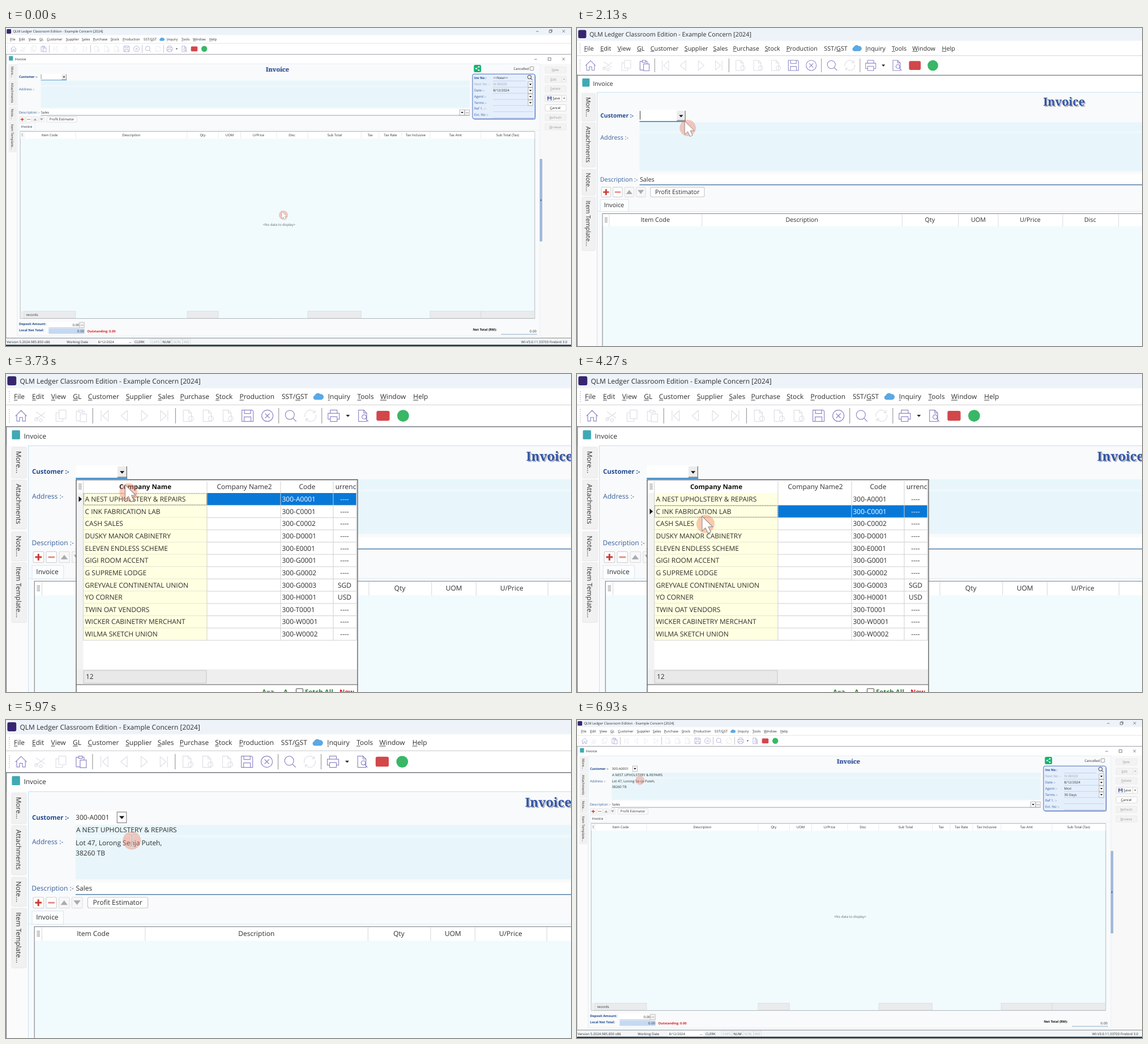
These frames come from a looping animation (998x561 px, 7.2 s). An HTML page with a canvas:

```html
<!DOCTYPE html>
<html lang="en">
<head>
<meta charset="utf-8">
<title>Invoice entry</title>
<style>
html, body { margin: 0; width: 100%; height: 100%; overflow: hidden; background: #fff; }
canvas { display: block; }
</style>
</head>
<body>
<canvas id="stage" width="998" height="561"></canvas>
<script>
const c = document.getElementById('stage').getContext('2d');
const LOOP = 7200, ZOOM = 2.003;
const INK = '#2e2e2e', NAVY = '#1f4a91', LABEL = '#375f9e', PURPLE = '#8d89c8', OFF = '#dedfe6';

// ---------- helpers ----------
function rect(x, y, w, h, fill, stroke, r = 0, lw = .6) {
  c.beginPath();
  c.roundRect(x, y, w, h, r);
  if (fill) { c.fillStyle = fill; c.fill(); }
  if (stroke) { c.strokeStyle = stroke; c.lineWidth = lw; c.stroke(); }
}
function line(x1, y1, x2, y2, color, lw = .6) {
  c.beginPath(); c.moveTo(x1, y1); c.lineTo(x2, y2);
  c.strokeStyle = color; c.lineWidth = lw; c.stroke();
}
function disc(x, y, r, color) {
  c.beginPath(); c.arc(x, y, r, 0, 7); c.fillStyle = color; c.fill();
}
// y is the middle of the capitals; key is the index of an underlined letter
function text(s, x, y, { color = INK, bold = false, align = 'left', size = bold ? 5.7 : 6, key = -1 } = {}) {
  c.font = `${bold ? 'bold ' : ''}${size}px "Open Sans", "Noto Sans", sans-serif`;
  c.textAlign = 'left';
  c.fillStyle = color;
  const w = c.measureText(s).width, base = y + size * .355;
  x -= align === 'center' ? w / 2 : align === 'right' ? w : 0;
  c.fillText(s, x, base);
  if (key >= 0) {
    const a = x + c.measureText(s.slice(0, key)).width;
    line(a, base + .9, a + c.measureText(s[key]).width, base + .9, color, .45);
  }
}
function path(d, x, y, stroke, fill, lw = .6) {
  c.save();
  c.translate(x, y);
  const p = new Path2D(d);
  if (fill) { c.fillStyle = fill; c.fill(p); }
  if (stroke) { c.strokeStyle = stroke; c.lineWidth = lw; c.lineJoin = 'round'; c.stroke(p); }
  c.restore();
}
const down = (x, y, color = '#111', k = 1) => path(`M${-2 * k} ${-k}H${2 * k}L0 ${1.2 * k}Z`, x, y, null, color);
function combo(x, y) { rect(x, y, 8.3, 9.6, '#fdfdfd', '#8a8a8a'); down(x + 4.15, y + 4.8, '#111', 1.15); }
function dots(x, y) {
  rect(x, y, 8.5, 9.4, '#f4f4f4', '#9a9a9a');
  for (let i = 0; i < 3; i++) rect(x + 2 + i * 1.9, y + 4.5, .9, .9, '#222');
}
function gridMark(x, y, k = 1) {
  for (let i = -2; i < 3; i++) line(x - 1.4 * k, y + i * 1.15 * k, x + 1.4 * k, y + i * 1.15 * k, '#888', .45 * k);
}

// ---------- window frame ----------
const MENU = [['File', 7], ['Edit', 23], ['View', 39.8], ['GL', 59], ['Customer', 72.3], ['Supplier', 105.7],
  ['Sales', 134], ['Purchase', 153.5], ['Stock', 184.8], ['Production', 206], ['SST/GST', 243.1, 4],
  ['Inquiry', 283.9], ['Tools', 309.8], ['Window', 330], ['Help', 359.1]];
const RING = 'M-5 0a5 5 0 1 0 10 0a5 5 0 1 0-10 0';
const PAGE = 'M-3.6-5H1L3.6-2.4V5H-3.6ZM1-5V-2.4H3.6';
const BADGE = PAGE + 'M1 2.5a2.2 2.2 0 1 0 4.4 0a2.2 2.2 0 1 0-4.4 0';
const CLIP = 'M-2-4H-4.5V4.5H-1M2.5-1.5V-4H1M-2.2-5H1V-3H-2.2ZM-1-1.5H4.5V5.3H-1Z';
const TOOLS = [
  [13.3, 'M-5 .3 0-4.7 5 .3M-3.8-.8V4.7H-1.3V1.4H1.3V4.7H3.8V-.8', 1],
  [30.5, 'M-4-3.5 4 2M-4 3 4-3M-5 3a1.3 1.3 0 1 0 2.6 0a1.3 1.3 0 1 0-2.6 0M-1 4a1.3 1.3 0 1 0 2.6 0a1.3 1.3 0 1 0-2.6 0'],
  [48.5, 'M-1.8-5H4.4V2.6H-1.8ZM-1.8-2.6H-4.4V5H1.6V2.6'],
  [87, 'M-3.2-4.8V4.8M3.2-4.6V4.6L-1.8 0Z'], [104.5, 'M2.6-4.7V4.7L-3 0Z'],
  [122, 'M-2.6-4.7V4.7L3 0Z'], [139.5, 'M3.2-4.8V4.8M-3.2-4.6V4.6L1.8 0Z'],
  [160, BADGE], [177.5, BADGE], [195, BADGE],
  [213, 'M-5-5H4L5-4V5H-5ZM-2.8-5V-2H2.8V-5M-3 5V1H3V5', 1],
  [230.5, RING + 'M-2-2 2 2M-2 2 2-2', 1],
  [251, 'M-4.7-.8a4 4 0 1 0 8 0a4 4 0 1 0-8 0M2.2 2.2 5 5', 1],
  [268.5, 'M-4.8 1A4.8 4.8 0 0 1 4-2.6V-5M4-2.6H1.6M4.8-1A4.8 4.8 0 0 1-4 2.6V5M-4 2.6H-1.6'],
  [289, 'M-3-2.2V-5H3V-2.2M-3 3H-5V-2.2H5V3H3M-3 .8H3V5H-3Z', 1],
  [314.5, PAGE + 'M-.6 1a1.9 1.9 0 1 0 3.8 0a1.9 1.9 0 1 0-3.8 0M2.7 2.6 5 5', 1]];

function drawFrame(popup) {
  rect(0, 0, 998, 561, '#fff');
  rect(0, 0, 998, 12.6, '#edf3f9');
  rect(1.2, 2, 7.9, 8, '#37266f', null, 1.5);
  text('QLM Ledger Classroom Edition - Example Concern [2024]', 12.2, 6.3);
  controls(938.5, 962, 985, 5.6, true);
  for (let y = 15; y < 25; y += 1.8) rect(2.6, y, .7, .7, '#b5b5b5');
  for (const [s, x, key = 0] of MENU) text(s, x, 20, { key });
  path('M-2.6 2.5a1.8 1.8 0 0 1-.2-3.5a2.7 2.7 0 0 1 4.6-1.1a2.3 2.3 0 0 1 1 4.6Z', 275.3, 20, '#3f8fd6', '#5aa9e6', .3);
  line(0, 27.2, 998, 27.2, '#d3d3d3');
  for (let y = 31; y < 43; y += 1.8) rect(2.6, y, .7, .7, '#b5b5b5');
  for (const x of [76.5, 149.5, 240.5, 278.5]) line(x, 30, x, 43.5, '#9c9c9c');
  for (const [x, d, on] of TOOLS) path(d, x, 36.8, on ? PURPLE : OFF);
  path(CLIP, 66.5, 36.8, popup ? OFF : PURPLE);
  down(301.5, 36.8, '#222', .85);
  rect(326.7, 32.4, 11.6, 8.8, '#d2474a', null, 1.6);
  disc(350.2, 36.8, 5.2, '#38b766');

  line(0, 46.4, 998, 46.4, '#737982', .7);
  line(.3, 46, .3, 547, '#737982', .7);
  rect(5.2, 49.6, 7.2, 8, '#3fa9b5', null, .8);
  text('Invoice', 15.7, 54.6);
  controls(935.6, 960, 984.8, 54.8);
}
function controls(a, b, d, y, restore) {
  line(a - 2.3, y + .4, a + 2.3, y + .4, '#333');
  if (restore) { path('M-1.3-1.5V-2.6H2.6V1.3H1.5', b, y, '#333'); rect(b - 2.6, y - 1.4, 4, 4, null, '#333'); }
  else rect(b - 2.5, y - 2.5, 5, 5, null, '#333');
  path('M-2.4-2.4 2.4 2.4M-2.4 2.4 2.4-2.4', d, y, '#333');
}

// ---------- invoice form ----------
const SIDE = [['More...', 64.5, 27], ['Attachments', 93.3, 43.3], ['Note...', 139, 25.5], ['Item Template...', 166.3, 52.5]];
const COLS = [['Item Code', 31.7, 77], ['Description', 123, 221.3], ['Qty', 320, 347.3], ['UOM', 375.3, 395],
  ['U/Price', 414.6, 446], ['Disc', 478, 505], ['Sub Total', 533, 580.5], ['Tax', 627.5, 643.3], ['Tax Rate', 659, 679],
  ['Tax Inclusive', 699, 723.5], ['Tax Amt', 749, 794], ['Sub Total (Tax)', 839, 886]];
const BUTTONS = ['New', 'Edit', 'Delete', 'Save', 'Cancel', 'Refresh', 'Browse'];

function drawForm(s) {
  rect(.7, 63, 19, 483.5, '#fbfbfb');
  for (const [label, y, h] of SIDE) {
    rect(5, y, 13, h, '#f1f1f1', '#e8e8e8', 1, .5);
    c.save();
    c.translate(11, y + 3.4);
    c.rotate(Math.PI / 2);
    text(label, 0, 0);
    c.restore();
  }
  rect(19.8, 63.2, 923.5, 480.5, '#f9fafb', '#c2dff5', 0, .5);

  c.font = 'bold 11px "Noto Serif", "DejaVu Serif", serif';
  c.textAlign = 'center';
  c.fillStyle = '#aeb0b8'; c.fillText('Invoice', 480.3, 77.4);
  c.fillStyle = '#3154a6'; c.fillText('Invoice', 479.3, 76.5);

  text('Customer :-', 23, 86, { color: NAVY, bold: true });
  text('Address :-', 23, 107.5, { color: LABEL });
  text('Description :-', 22.7, 148.7, { color: LABEL });
  rect(61.5, 92.7, 757.5, 9, '#e8f6fb');
  rect(61.5, 103.4, 757.5, 37.3, '#e8f6fb');
  rect(61.5, 101.7, 757.5, 1.7, '#f0f8fc');
  rect(61.5, 80.5, 46, 11.5, '#fff');
  if (s.filled) {
    combo(98.2, 81.2);
    text('300-A0001', 61.6, 85.8);
    text('A NEST UPHOLSTERY & REPAIRS', 62, 97);
    text('Lot 47, Lorong Senja Puteh,', 61.6, 108.3);
    text('38260 TB', 61.6, 117.5);
  } else {
    rect(98.3, 81.3, 8.3, 9.8, '#ececec');
    line(106.5, 81.3, 106.5, 91.2, '#666', .6);
    line(98.3, 90.9, 106.7, 90.9, '#666', .6);
    down(102.4, 86.5);
    line(61.5, 91.9, 107, 91.9, '#1f78bd', .8);
    if (!s.popup) line(62.1, 81.5, 62.1, 90, '#222', .5);
  }
  rect(61.5, 143.6, 757.5, 10.2, '#fff');
  text('Sales', 61.8, 148.6);
  line(61.5, 154.1, 819, 154.1, '#35699b', .6);
  combo(801.5, 144.3);
  dots(810.3, 144.4);

  for (const x of [24, 35.4]) rect(x, 156.5, 9.3, 9.6, '#fdfdfd', '#d2d2d2', 1);
  for (const x of [46.8, 58.2]) rect(x, 156.5, 9.3, 9.6, '#f7f7f7', '#e0e0e0', 1);
  path('M-2.9 0H2.9M0-2.9V2.9', 28.6, 161.3, '#cc3a33', null, 1.5);
  path('M-2.9 0H2.9', 40.1, 161.3, '#e38b85', null, 1.4);
  path('M-3.1 2H3.1L0-2ZM8.3-2H14.5L11.4 2Z', 51.4, 161.2, null, '#aaabb0');
  rect(72.2, 156.5, 53.2, 9.5, '#fefefe', '#c9c9c9', 1.5);
  text('Profit Estimator', 98.7, 161.1, { align: 'center' });
  line(20, 180.2, 943, 180.2, '#dce9f3', .5);
  rect(23, 168.6, 27.8, 11.8, '#fbfdfe', '#d9e5ef', 0, .5);
  text('Invoice', 26.6, 174);

  drawGrid(s.hover);
  drawTotals();
  drawNumbers(s.filled);
  drawSide();
  drawStatus();
}
function drawGrid(hover) {
  rect(25.1, 182.5, 908.8, 330, '#f1fbfd', '#858a8e', 0, .6);
  rect(25.5, 182.9, 908, 12, '#fff');
  gridMark(28.6, 188.7);
  if (hover) {
    rect(123, 183, 197, 12, '#d5e7f7');
    path('M-2-2H2L.6 0V2.2H-.6V0Z', 316.4, 187.9, '#7f93aa', null, .5);
  }
  rect(25.6, 499.3, 6, 12.9, '#eee');
  COLS.forEach(([label, x, mid], i) => {
    line(x, 183, x, 195, '#d3d7da', .5);
    text(label, hover && i === 1 ? 218.5 : mid, 188.6, { align: 'center' });
    const end = i < 11 ? COLS[i + 1][1] : 933.6;
    if ([0, 2, 6, 10, 11].includes(i)) rect(x, 499.5, end - x, 12.4, '#e9ebec', '#cdd1d3', 0, .5);
  });
  text('records', 35.5, 505.5);
  text('<No data to display>', 482.4, 346.5, { align: 'center', color: '#666' });
}
function drawTotals() {
  const bold = true, right = { align: 'right' };
  text('Deposit Amount:', 23, 521.6, { color: NAVY, bold });
  rect(75.5, 518.5, 54, 10.3, '#fff');
  line(75.5, 528.9, 129.5, 528.9, '#6d8fb8');
  text('0.00', 129.3, 523.7, right);
  dots(129.7, 519.2);
  text('Local Net Total:', 23, 533, { color: NAVY, bold });
  rect(75.3, 530.2, 63.4, 9.2, '#c4d9f2');
  text('0.00', 138, 535, right);
  text('Outstanding: 0.00', 143.5, 535, { color: '#d41f26', bold });
  text('Net Total (RM):', 824.7, 532.3, { bold, color: '#111' });
  text('0.00', 937, 534.6, right);
  line(874.5, 540.3, 938, 540.3, '#4b76ad');
}
function drawNumbers(filled) {
  rect(826.4, 65, 12.8, 13, '#14b371', null, 2.5);
  path('M2.3-3-2.6 0 2.3 3', 832.9, 71.5, '#fff');
  for (const [x, y] of [[835.2, 68.5], [830.3, 71.5], [835.2, 74.5]]) disc(x, y, 1.3, '#fff');
  text('Cancelled', 896.5, 71.5);
  rect(925.7, 68.2, 6.2, 6.4, '#fff', '#555', .6);

  rect(825.5, 82.5, 110.3, 79.4, '#bcc6da', null, 3);
  rect(824, 81.2, 110.4, 79, '#e5effc', '#4a6cc4', 3, 1);
  const rows = [['Inv No :', filled ? '' : '<<New>>'], ['Next No :-', 'IV-00020'], ['Date :-', '8/12/2024'],
    ['Agent :-', filled ? 'Mori' : ''], ['Terms :-', filled ? '30 Days' : ''], ['Ref 1. :-', ''], ['Ext. No :-', '']];
  rows.forEach(([label, value], i) => {
    const y = 88.2 + i * 10.82, pale = i === 1;
    text(label, 827, y, { color: i ? pale ? '#93a4c4' : LABEL : NAVY, bold: !i });
    text(value, 860.5, y, { color: pale ? '#9a9fa8' : INK });
    line(860, y + 5.3, i ? 931 : 918, y + 5.3, '#a9c1e6', .6);
    if (i > 0 && i < 5) combo(922.2, y - 4.3);
  });
  disc(924.6, 86.5, 3.1, '#fff');
  path('M-3.9-.8a3.2 3.2 0 1 0 6.4 0a3.2 3.2 0 1 0-6.4 0M1.6 1.6 4.3 4.5', 925.3, 87.3, '#333', null, 1);
}
function drawSide() {
  rect(943.6, 63, 54.4, 483.5, '#f8f8f8');
  BUTTONS.forEach((label, i) => {
    const y = 73.8 + i * 16.78, on = i === 3 || i === 4, split = i === 1 || i === 3;
    const fill = on ? '#fff' : '#f3f3f3', edge = on ? '#c4c4c4' : '#e3e3e3', ink = on ? '#222' : '#9b9b9b';
    rect(952.3, y - 5.5, split ? 29.5 : 37, 11, fill, edge, 1.2);
    if (split) { rect(981.8, y - 5.5, 8, 11, fill, edge, 1.2); down(985.9, y, ink, .8); }
    text(label, i === 3 ? 972 : split ? 967 : 970.3, y, { align: 'center', color: ink, key: 0 });
  });
  rect(956.4, 120.4, 7.2, 7.4, '#3d4b8f', null, .6);
  rect(958, 120.4, 4, 2.5, '#dfe5f5');
  rect(957.8, 124.3, 4.4, 3.5, '#fff');
  rect(943.3, 231.5, 3.4, 144.5, '#a5bfe2', '#6587b8', .5);
  path('M-.8-1.7V1.7L1 0Z', 945, 303.8, null, '#223f70');
}
function drawStatus() {
  rect(0, 546.8, 998, 12.2, '#f4f5f6');
  line(0, 547, 998, 547, '#737982', .9);
  rect(0, 558.8, 998, 2.2, '#17364f');
  text('Version 5.2024.985.850 x86', 1, 553.5);
  text('Working Date', 107.3, 553.5);
  rect(160.5, 548.8, 63, 9.5, '#fff');
  text('8/12/2024', 162.5, 554.3);
  path('M-1.7-.8 0 .9 1.7-.8', 219.2, 555, '#444');
  text('CLERK', 227, 553.5);
  [['CAPS', 255, 18.4], ['NUM', 274.3, 18.4], ['SCRL', 293.4, 18.2], ['INS', 312.3, 13.2]].forEach(([s, x, w], i) => {
    rect(x, 548.8, w, 9.3, null, '#cfcfcf', 0, .5);
    text(s, x + w / 2, 553.5, { align: 'center', color: i === 1 ? '#222' : '#b0b0b0' });
  });
  text('WI-V3.0.11.33703 Firebird 3.0', 991.5, 553.5, { align: 'right' });
}

// ---------- customer list, measured at full zoom ----------
const FIRMS = ['A NEST UPHOLSTERY & REPAIRS|A0001', 'C INK FABRICATION LAB|C0001', 'CASH SALES|C0002',
  'DUSKY MANOR CABINETRY|D0001', 'ELEVEN ENDLESS SCHEME|E0001', 'GIGI ROOM ACCENT|G0001', 'G SUPREME LODGE|G0002',
  'GREYVALE CONTINENTAL UNION|G0003|SGD', 'YO CORNER|H0001|USD', 'TWIN OAT VENDORS|T0001',
  'WICKER CABINETRY MERCHANT|W0001', 'WILMA SKETCH UNION|W0002'];
const ROW = 21.65, TOP = 210;

function drawPopup(sel) {
  c.save();
  c.scale(1 / ZOOM, 1 / ZOOM);
  const size = 12, edge = '#cfcfcf', mid = 'center';
  rect(124, 186.5, 497, 392, '#fff', '#555', 0, 1.3);
  rect(125, 209.5, 11.5, 338, '#f3f3f3');
  gridMark(131, 198.5, 2);
  text('Company Name', 246, 199, { size: 11.6, bold: true, align: mid, color: '#111' });
  text('Company Name2', 421, 199, { size, align: mid });
  text('Code', 532, 199, { size, align: mid });
  text('urrenc', 600, 199, { size, align: mid });
  FIRMS.forEach((firm, i) => {
    const [name, code, money = '----'] = firm.split('|');
    const y = TOP + i * ROW, on = i === sel, color = on ? '#fff' : INK;
    rect(136.5, y, 218.5, ROW, '#ffffe1');
    if (on) rect(355, y, 264, ROW, '#0878d7');
    line(136.5, y + ROW, 619, y + ROW, edge, 1);
    text(name, 139.5, y + 10.7, { size });
    text('300-' + code, 487.5, y + 10.7, { size, color });
    text(money, 598, y + 10.7, { size, color, align: mid });
  });
  for (const x of [136.5, 355, 485, 578, 619]) line(x, 189, x, TOP + 12 * ROW, edge, 1);
  const y = TOP + sel * ROW;
  c.setLineDash([1.5, 1.5]);
  rect(137.5, y + .8, 217, ROW - 1.5, null, '#555', 0, 1);
  c.setLineDash([]);
  path('M-2.5-5V5L3 0Z', 131, y + 10.8, null, '#111');
  rect(125, 521, 495, 26.5, '#efefef');
  rect(137, 523, 217, 22.5, '#e9e9e9', '#c6c6c6', 0, 1);
  text('12', 141, 534, { size });
  line(124, 548, 621, 548, '#555', 1.2);
  const green = { size: 11.6, bold: true, color: '#23822c' };
  text('A=a', 452, 561, green);
  text('A', 490, 561, green);
  rect(512.5, 555, 12, 12, '#fff', '#444', 1, 1);
  text('Fetch All', 528, 561, green);
  text('New', 589, 561, { ...green, color: '#e01818' });
  c.restore();
}

// ---------- pointer and timing ----------
const MOVES = [[0, 490, 330], [800, 490, 330], [1030, 303, 239], [1230, 303, 239], [1370, 197, 167], [1630, 109, 98.3],
  [2730, 109, 98.3], [2830, 110.8, 95.3], [3050, 106, 93.5], [3560, 106, 93.5], [4170, 113.3, 132],
  [4300, 113.3, 132], [4770, 113, 117.5], [5470, 113, 117.5], [5800, 111.2, 106.4], [LOOP, 111.2, 106.4]];
const ease = p => p < .5 ? 4 * p ** 3 : 1 - 4 * (1 - p) ** 3;
const span = (t, from, len) => ease(Math.min(1, Math.max(0, (t - from) / len)));

function pointerAt(t) {
  const i = MOVES.findIndex(m => m[0] > t), [t0, x0, y0] = MOVES[i - 1], [t1, x1, y1] = MOVES[i];
  const p = (t - t0) / (t1 - t0);
  return [x0 + (x1 - x0) * p, y0 + (y1 - y0) * p];
}
function drawPointer(x, y, beam) {
  disc(x, y, 8, 'rgba(240,128,104,.42)');
  if (beam) {
    const d = 'M-2-5.4Q0-5.4 0-4.4Q0-5.4 2-5.4M0-4.4V4.4M-2 5.4Q0 5.4 0 4.4Q0 5.4 2 5.4';
    path(d, x, y, '#fff', null, 1.3);
    path(d, x, y, '#888', null, .5);
  } else {
    path('M0 0V13L3 10.2L5.2 15L7.7 13.9L5.5 9.3H9.4Z', x - 3, y - 6.7, '#8a8480', '#fff', .5);
  }
}
function draw(now) {
  const t = now % LOOP;
  const zoom = 1 + (ZOOM - 1) * (span(t, 1830, 480) - span(t, 5919, 500));
  const [x, y] = pointerAt(t);
  const filled = t >= 5000, popup = t >= 3470 && !filled;
  c.setTransform(zoom, 0, 0, zoom, 0, 0);
  c.textRendering = 'geometricPrecision';
  drawFrame(popup);
  drawForm({ filled, popup, hover: t >= 1270 && t < 1430 });
  if (popup) {
    const row = Math.floor(((y - 6.7) * ZOOM - TOP) / ROW);
    drawPopup(Math.max(0, Math.min(11, row)));
  }
  drawPointer(x, y, filled);
}
const start = performance.now();
(function tick() {
  draw(performance.now() - start);
  requestAnimationFrame(tick);
})();
</script>
</body>
</html>
```
